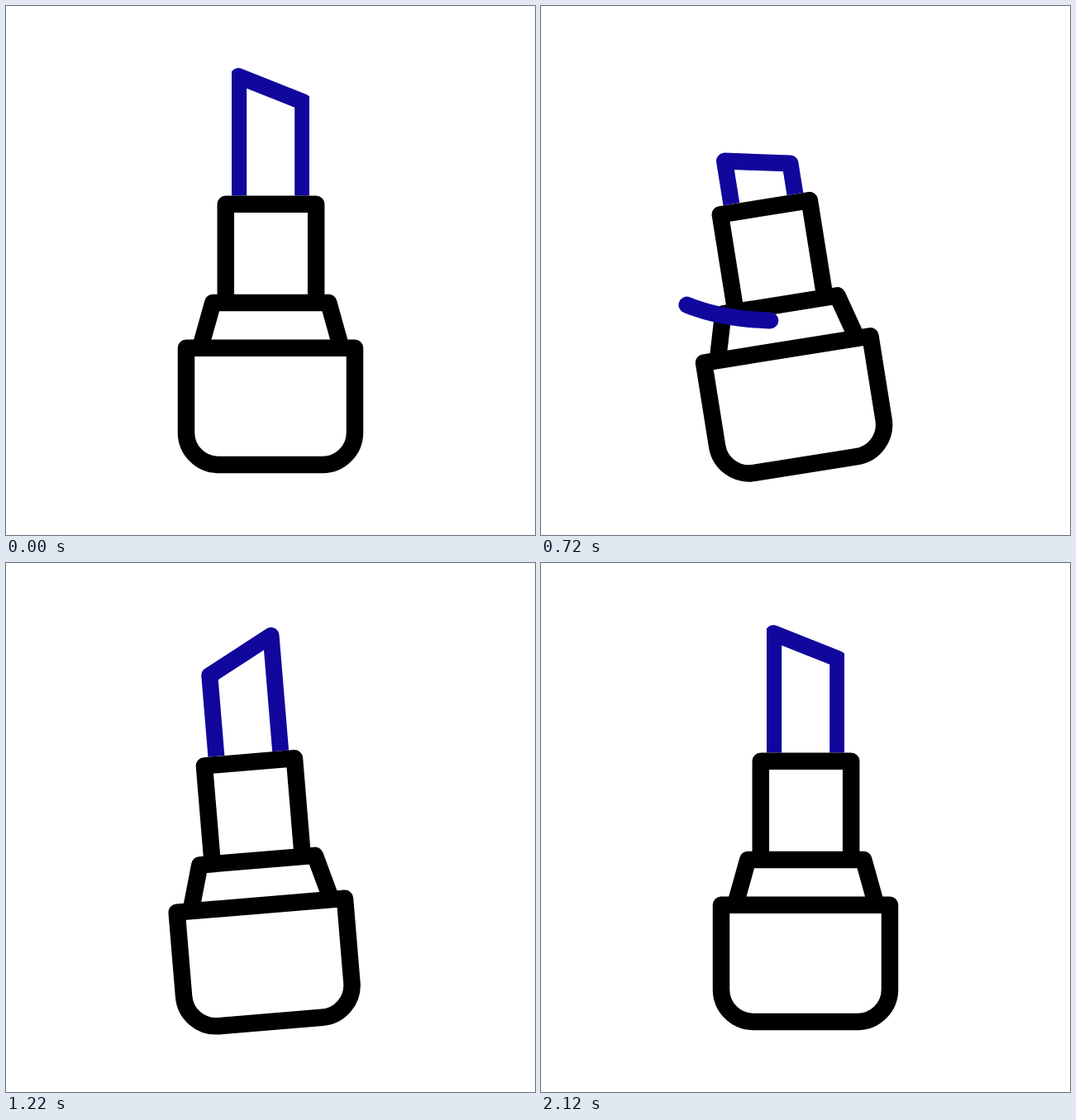
Write an HTML page that moves like this. It is 640x640 px and loops after 2400 ms.

```html
<!DOCTYPE html>
<html lang="en">
<head>
<meta charset="utf-8">
<title>Lipstick</title>
<style>
  html, body { margin: 0; width: 100%; height: 100%; overflow: hidden; background: #fff; }
  svg { display: block; width: 100vw; height: 100vh; }
  path { fill: none; stroke-linecap: round; stroke-linejoin: round; stroke-width: 20; }
  .case path { stroke: #000; stroke-width: 20.5; }
  .paint { stroke: #11079c; }
  .ray { stroke: #000; }
</style>
</head>
<body>
<svg viewBox="0 0 640 640">
  <defs><clipPath id="window"><rect id="slot" y="-100" height="329.5"/></clipPath></defs>
  <g id="lipstick">
    <g clip-path="url(#window)">
      <path id="crease" class="paint"/>
      <path id="tip" class="paint"/>
    </g>
    <g class="case">
      <path d="M265.8 355V239.8H375.2V355"/>
      <path d="M236 410L250.3 359H390.3L404.5 410"/>
      <path d="M218 413.7H422V516a39 39 0 0 1-39 39H257a39 39 0 0 1-39-39Z"/>
    </g>
  </g>
  <path id="swipe" class="paint"/>
  <path class="ray"/><path class="ray"/><path class="ray"/>
</svg>
<script>
const LOOP = 2400, STEP = 20;
const $ = id => document.getElementById(id);
const rays = document.querySelectorAll('.ray');

const mix = (a, b, u) => a + (b - a) * u;

// Smooth progress from 0 at time a to 1 at time b.
function ease(t, a, b) {
  const u = Math.min(1, Math.max(0, (t - a) / (b - a)));
  return u * u * (3 - 2 * u);
}

// Swings alternate in direction, each smaller and shorter, and end upright.
function tiltAt(t) {
  const swings = 5;
  let begin = 0, end = 560, from = 0, to = -21, span = 380;
  for (let i = 1; i < swings && t > end; i++) {
    from = to;
    to = i === swings - 1 ? 0 : to * -0.485;
    begin = end;
    end += span;
    span *= 0.79;
  }
  return mix(from, to, ease(t, begin, end));
}

function drawTip(t, tilt) {
  const height = 100.5 + 155 * ease(t, 0, 380) - 142 * ease(t, 560, 880) - 13 * ease(t, 1000, 1700);
  const slant = 31 * (1 - ease(t, 380, 560) + ease(t, 560, 880))
    + 73 * (ease(t, 1260, 1700) - ease(t, 900, 1220));
  const left = height - slant / 2, right = height + slant / 2;
  const half = 47 + Math.min(3, Math.abs(tilt) * 0.7);
  $('slot').setAttribute('x', 320 - half);
  $('slot').setAttribute('width', 2 * half);
  $('tip').setAttribute('d', `M281.2 310V${left}L359.2 ${right}V310`);

  // The cut face folds over toward the left edge.
  const u = (t - 880) / 120;
  let d = '';
  if (u > 0 && u < 1) {
    const x = mix(335, 281, u), y = mix(left, right, (x - 281) / 78);
    const low = mix(194, 153, u);
    d = `M${x} ${y}Q${x - 6} ${low - 14} 285 ${low}`;
  }
  $('crease').setAttribute('d', d);
}

// A stroke of paint sliding along a curve that is flat in the middle.
function drawSwipe(t) {
  const tail = mix(-186, 130, ease(t, 613, 1078));
  const head = mix(-186, 151, ease(t, 540, 940)) - 21 * ease(t, 940, 1080);
  const points = [];
  for (let i = 0; i <= 16; i++) {
    const dx = mix(tail, head, i / 16);
    points.push(`${320 + dx} ${381 - 20 * Math.abs(dx / 145) ** 3}`);
  }
  $('swipe').setAttribute('d', t > 540 && t < 1080 ? 'M' + points.join('L') : '');
}

// Rays shoot outward one after another around a centre above the case.
function drawRay(ray, i, t) {
  const start = 1540 + i * 140, angle = (i - 1) * Math.PI / 4;
  const along = begin => mix(88, 118, ease(t, begin, begin + 160));
  const point = r => `${320 + r * Math.sin(angle)} ${154 - r * Math.cos(angle)}`;
  const visible = t > start && t < start + 300;
  ray.setAttribute('d', visible ? `M${point(along(start + 140))}L${point(along(start))}` : '');
}

function draw(t) {
  const tilt = tiltAt(t);
  $('lipstick').setAttribute('transform', `rotate(${tilt} 320 555)`);
  drawTip(t, tilt);
  drawSwipe(t);
  rays.forEach((ray, i) => drawRay(ray, i, t));
}

const origin = performance.now();
function frame() {
  const t = (performance.now() - origin) % LOOP;
  draw(Math.floor(t / STEP) * STEP);
  requestAnimationFrame(frame);
}
draw(0);
requestAnimationFrame(frame);
</script>
</body>
</html>
```
